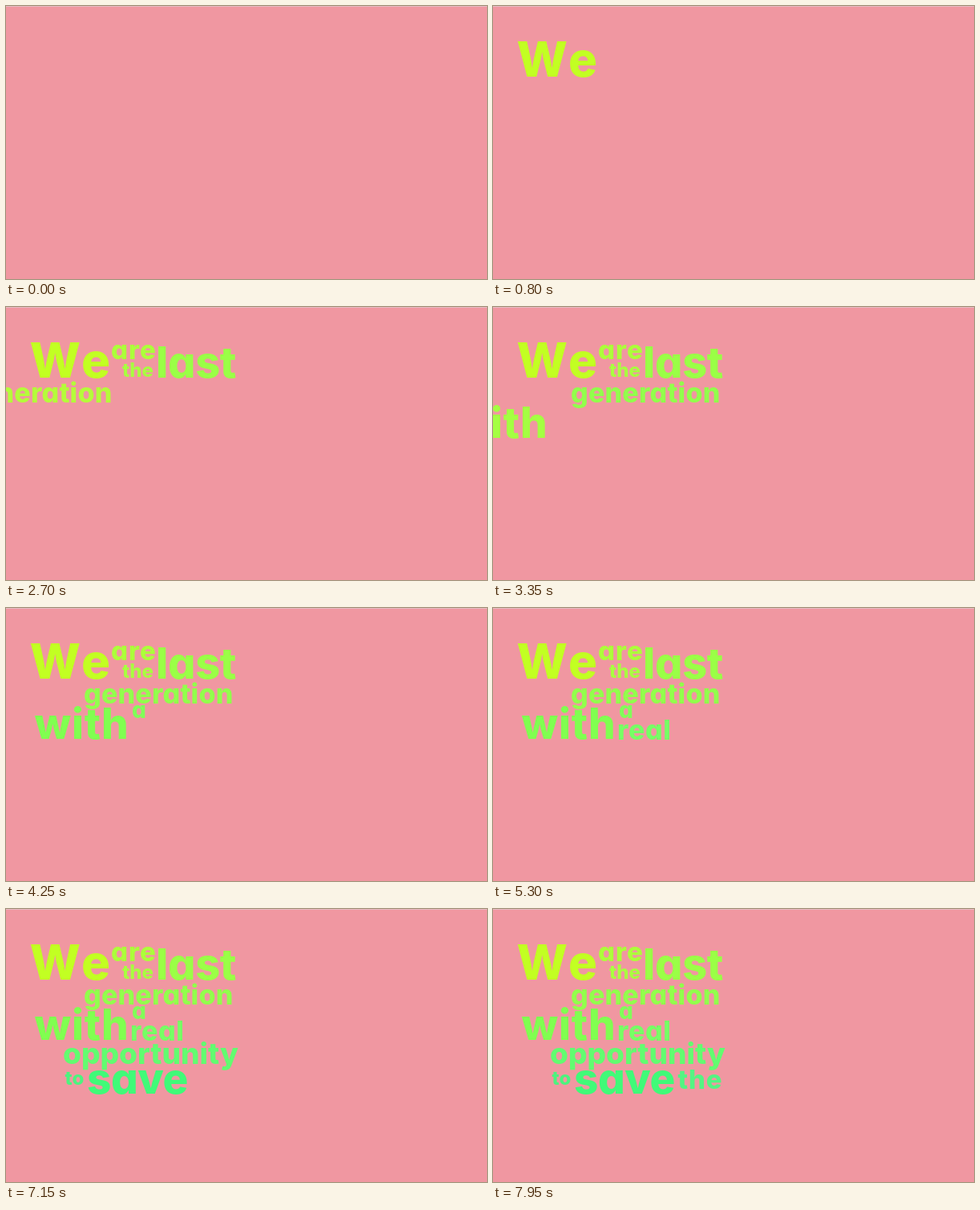
Animation of 600x340 px, one loop 8 s. Source, as an HTML page:

```html
<!DOCTYPE html>
<html lang="en">
<head>
<meta charset="utf-8">
<title>We are the last generation</title>
<style>
html, body { margin: 0; width: 100%; height: 100%; overflow: hidden; background: #f097a1; }
svg { display: block; width: 100%; height: 100%; }
text {
  font-family: Inter, Lato, sans-serif;
  font-weight: 800;
  font-feature-settings: "cv11";
  fill: var(--c);
  animation: 8s steps(1) infinite;
}
.we    { --c: #c2ff22; font-size: 60px; letter-spacing: 4px; animation-name: we; }
.are   { --c: #acff3a; font-size: 33px; letter-spacing: 1px; animation-name: are; }
.the   { --c: #a8ff40; font-size: 24px; animation-name: the; }
.last  { --c: #9aff46; font-size: 54px; letter-spacing: -.3px; animation-name: last; }
.gen   { --c: #92ff4c; font-size: 34px; letter-spacing: .2px; animation-name: gen; }
.with  { --c: #80ff50; font-size: 53px; letter-spacing: .8px; animation-name: with; }
.a     { --c: #80ff58; font-size: 28px; animation-name: a; }
.real  { --c: #76ff64; font-size: 34px; letter-spacing: .6px; animation-name: real; }
.opp   { --c: #62fc70; font-size: 37px; animation-name: opp; }
.to    { --c: #4cf47e; font-size: 24px; animation-name: to; }
.save  { --c: #40fa78; font-size: 53px; letter-spacing: -.5px; animation-name: save; }
.the2  { --c: #54f482; font-size: 33px; letter-spacing: .8px; animation-name: the2; }

/* 0.625% is one 50 ms step */
@keyframes we {
  0%, 3.125% { transform: translateY(-100px); fill: #ffee14; animation-timing-function: steps(8); }
  8.125%, 100% { transform: none; fill: var(--c); }
}
@keyframes are {
  0%, 12.5% { transform: translateY(-70px); fill: #ffee14; animation-timing-function: steps(8); }
  17.5% { transform: none; fill: #d4ff20; animation-timing-function: steps(16); }
  27.5%, 100% { transform: none; fill: var(--c); }
}
@keyframes the {
  0%, 16.875% { opacity: 0; fill: #ffee14; animation-timing-function: steps(4); }
  19.375% { opacity: 1; fill: #d0ff24; animation-timing-function: steps(16); }
  29.375%, 100% { opacity: 1; fill: var(--c); }
}
@keyframes last {
  0%, 20.625% { transform: translateX(427px); fill: #ffee14; animation-timing-function: steps(10); }
  26.875%, 100% { transform: none; fill: var(--c); }
}
@keyframes gen {
  0%, 31.875% { transform: translateX(-302px); fill: #d8f828; animation-timing-function: steps(6); }
  35.625%, 100% { transform: none; fill: var(--c); }
}
@keyframes with {
  0%, 40% { transform: translateX(-170px); fill: #c8ff34; animation-timing-function: steps(6); }
  43.75%, 100% { transform: none; fill: var(--c); }
}
@keyframes a {
  0%, 48.75% { opacity: 0; animation-timing-function: steps(4); }
  51.25%, 100% { opacity: 1; }
}
@keyframes real {
  0%, 59.375% { opacity: 0; animation-timing-function: steps(6); }
  63.125%, 100% { opacity: 1; }
}
@keyframes opp {
  0%, 69.375% { transform: translateX(540px); fill: #d8ff28; animation-timing-function: steps(9); }
  75%, 100% { transform: none; fill: var(--c); }
}
@keyframes save {
  0%, 80% { transform: translateY(86px); opacity: 0; animation-timing-function: steps(8); }
  85%, 100% { transform: none; opacity: 1; }
}
@keyframes to {
  0%, 85% { opacity: 0; animation-timing-function: steps(4); }
  87.5%, 100% { opacity: 1; }
}
@keyframes the2 {
  0%, 91.875% { opacity: 0; animation-timing-function: steps(6); }
  95.625%, 100% { opacity: 1; }
}
</style>
</head>
<body>
<svg viewBox="0 0 600 340">
  <rect width="600" height="1" fill="#e6bcc2"/>
  <text class="we" x="29.5" y="87.5">We</text>
  <text class="are" x="131" y="65">are</text>
  <text class="the" x="145" y="87">the</text>
  <text class="last" x="187" y="88">last</text>
  <text class="gen" x="97" y="119">generation</text>
  <text class="with" x="35.5" y="163">with</text>
  <text class="a" x="157" y="137">a</text>
  <text class="real" x="155" y="164">real</text>
  <text class="opp" x="71" y="192.5">opportunity</text>
  <text class="to" x="73.5" y="219">to</text>
  <text class="save" x="101" y="230">save</text>
  <text class="the2" x="230.5" y="224">the</text>
</svg>
</body>
</html>
```
